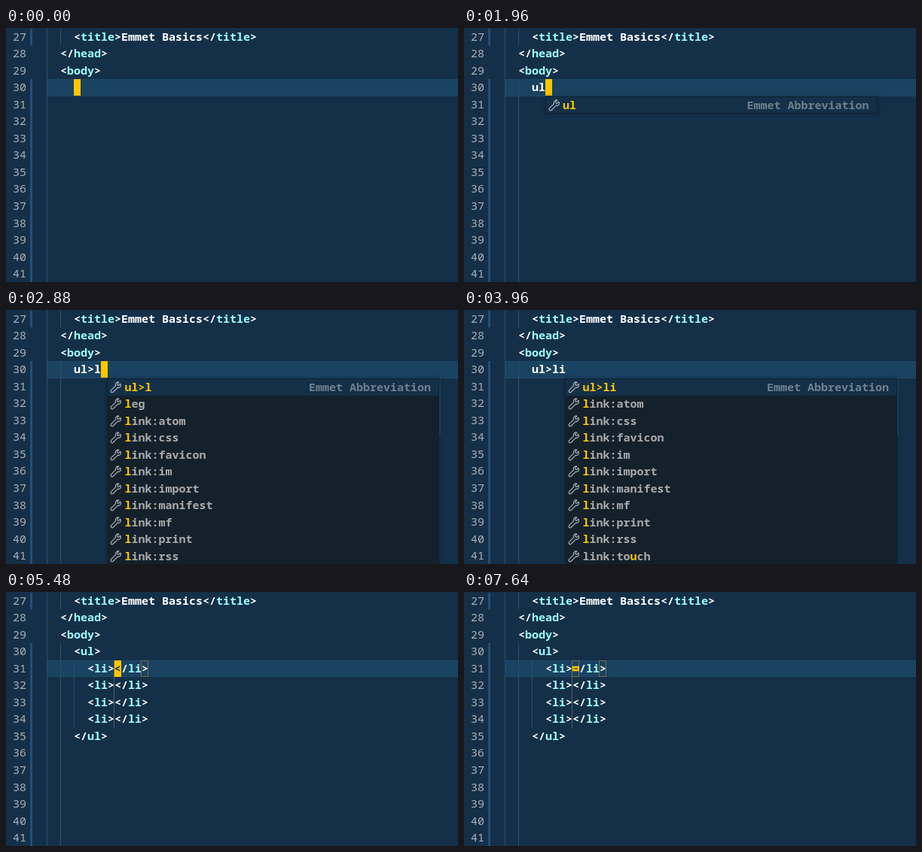
An HTML page for the animation above (7.68 s loop, 600 px wide and 338 px high).

```html
<!DOCTYPE html>
<html lang="en">
<head>
<meta charset="utf-8">
<title>Emmet Basics</title>
<style>
  html, body { margin: 0; width: 100%; height: 100%; overflow: hidden; background: #143048; }
  #stage {
    --row: 22.54px;
    position: relative; width: 600px; height: 338px; overflow: hidden;
    background: #143048; color: #fff;
    font: 600 15px/21.3px "Noto Sans Mono", "DejaVu Sans Mono", monospace;
    font-variant-ligatures: none; white-space: pre;
  }
  #stage div, #stage svg { position: absolute; }
  #back, #code, #popup { left: 0; top: 0; }
  .num { left: 9px; color: #a9b0b5; font-weight: 500; }
  .tag { color: #9effff; }
  .bar { left: 32px; width: 3px; background: #234f77; }
  .guide { width: 1px; background: #28506c; }
  .stop { width: 1px; background: #4c5c68; }
  .match { width: 8px; height: 20px; border: 1px solid #76703f; }
  #band { left: 54px; right: 0; height: 20.5px; background: #1a4261; border: solid #1e4a6b; border-width: 1px 0; }
  #cursor { width: 9px; height: 22px; background: #ffc600; color: #143048; }
  .menu {
    top: 90.6px; width: 439px; overflow: hidden; color: #aaa;
    background: #14212b; border: 1px solid #0e202e; box-shadow: 0 0 5px #0a1c2b88;
  }
  .item { left: 0; width: 100%; height: var(--row); }
  .item.on { background: #143048; }
  .item b { position: absolute; left: 22.5px; font-weight: 600; }
  .item i { color: #ffc600; font-style: normal; font-weight: 800; }
  .item em { position: absolute; right: 10px; color: #70818c; font-style: normal; }
  .item svg { left: 3px; top: 3px; width: 16px; height: 16px; fill: none; stroke: #a9aeb1; stroke-width: 1.2; stroke-linejoin: round; }
  .slider { left: 575px; top: 92px; width: 2px; height: 75px; background: #1b3a53; }
</style>
</head>
<body>
<div id="stage">
  <div id="band"></div>
  <div id="back"></div>
  <div id="code"></div>
  <div id="cursor"></div>
  <div id="popup"></div>
</div>
<script>
const LOOP = 7680, ROW = 22.54, COL = 9, LEFT = 54, FIRST = 27;
const $ = id => document.getElementById(id);
const top_ = line => 0.6 + (line - FIRST) * ROW;
const left = col => LEFT + col * COL;
const esc = s => s.replace(/</g, '&lt;').replace(/>/g, '&gt;');

const box = (cls, x, y, w, h, body = '') =>
  `<div class="${cls}" style="left:${x}px;top:${y}px;${w ? `width:${w}px;` : ''}${h ? `height:${h}px` : ''}">${body}</div>`;
const span = (cls, x, from, to) => box(cls, x, top_(from), 0, (to - from) * ROW);
const paint = s => s.replace(/<(\/?)(\w+)>|[<>]/g, (all, slash, name) =>
  name ? `&lt;${slash}<span class="tag">${name}</span>&gt;` : esc(all));
const row = (line, col, s) => box('', left(col), top_(line), 0, 0, paint(s));

const WRENCH = '<svg viewBox="0 0 16 16"><path d="M13.8 3.2l-2.3 2.2-1.5-.6-.4-1.5 2.2-2.2C9 .4 6.7 2.8 7.6 5.6L1.6 11.7a1.75 1.75 0 0 0 2.6 2.5l6.2-6.1c2.7.9 5.1-1.9 3.4-4.9z"/></svg>';

// Matched letters in menu labels are wrapped in brackets.
const item = (label, i) => `<div class="item${i ? '' : ' on'}" style="top:${i * ROW}px">${WRENCH}<b>` +
  esc(label).replace(/\[(.*?)\]/g, '<i>$1</i>') + `</b>${i ? '' : '<em>Emmet Abbreviation</em>'}</div>`;
const menu = (x, labels) =>
  `<div class="menu" style="left:${x - 0.5}px;height:${labels.length * ROW - 1}px">${labels.map(item).join('')}</div>` +
  (labels.length > 1 ? '<div class="slider"></div>' : '');

const links = 'atom css favicon im import manifest mf print rss'.split(' ').map(s => '[l]ink:' + s);
const menus = {
  ul: menu(108, ['[ul]']),
  l: menu(134.5, ['[ul>l]', '[l]eg', ...links]),
  li: menu(134.5, ['[ul>li]', ...links, 'link:to[u]ch']),
  star: menu(144, ['[ul>li*]']),
  four: menu(152.5, ['[ul>li*4]'])
};

// Typed text by time; null marks the expanded list.
const keys = [
  [-500, ''], [1160, 'u'], [1360, 'ul'], [2300, 'ul>'], [2640, 'ul>l'],
  [2960, 'ul>li'], [4100, 'ul>li*'], [4400, 'ul>li*4'], [5432, null]
];
const popups = [
  [0, ''], [1500, 'ul'], [2300, ''], [2740, 'l'], [3060, 'li'],
  [4100, ''], [4170, 'star'], [4500, 'four'], [5432, '']
];
const at = (list, t) => list.filter(e => e[0] <= t).pop();

function drawBack(text) {
  let s = span('bar', 32, 27, 28) + span('bar', 32, 30, 42) +
    span('guide', left(0), 27, 42) + span('guide', left(2), 27, 28);
  if (text !== '') s += span('guide', left(2), 30, 42);
  if (text === null) {
    s += span('guide', left(4), 31, 35) + span('stop', left(10) - 1, 32, 35);
    s += box('match', 143, top_(31)) + box('match', 179, top_(31));
  }
  return s;
}

function drawCode(text) {
  let s = '';
  for (let n = FIRST; n <= 41; n++) s += box('num', 9, top_(n), 0, 0, n);
  s += row(27, 4, '<title>Emmet Basics</title>') + row(28, 2, '</head>') + row(29, 2, '<body>');
  if (text !== null) return s + row(30, 4, text);
  s += row(30, 4, '<ul>') + row(35, 4, '</ul>');
  for (let n = 31; n < 35; n++) s += row(n, 6, '<li></li>');
  return s;
}

// Solid for half a second after a key, then shrinks and grows.
function blink(age) {
  if (age < 500) return 1;
  const p = (age - 500) % 1000, half = p < 500 ? p : 1000 - p;
  const u = Math.min(1, Math.max(0, (half - 100) / 300));
  return 1 - u * u * (3 - 2 * u);
}

let shownText, shownMenu;
function frame() {
  const t = performance.now() % LOOP;
  const [since, text] = at(keys, t), name = at(popups, t)[1];
  const cursor = $('cursor');
  if (text !== shownText) {
    const line = text === null ? 31 : 30;
    $('back').innerHTML = drawBack(text);
    $('code').innerHTML = drawCode(text);
    $('band').style.top = cursor.style.top = top_(line) + 'px';
    cursor.style.left = (text === null ? left(10) : left(4 + text.length)) - 0.5 + 'px';
    cursor.textContent = text === null ? '<' : '';
    shownText = text;
  }
  if (name !== shownMenu) {
    $('popup').innerHTML = menus[name] || '';
    shownMenu = name;
  }
  cursor.style.transform = `scaleY(${blink(t - since)})`;
  requestAnimationFrame(frame);
}
frame();
</script>
</body>
</html>
```
